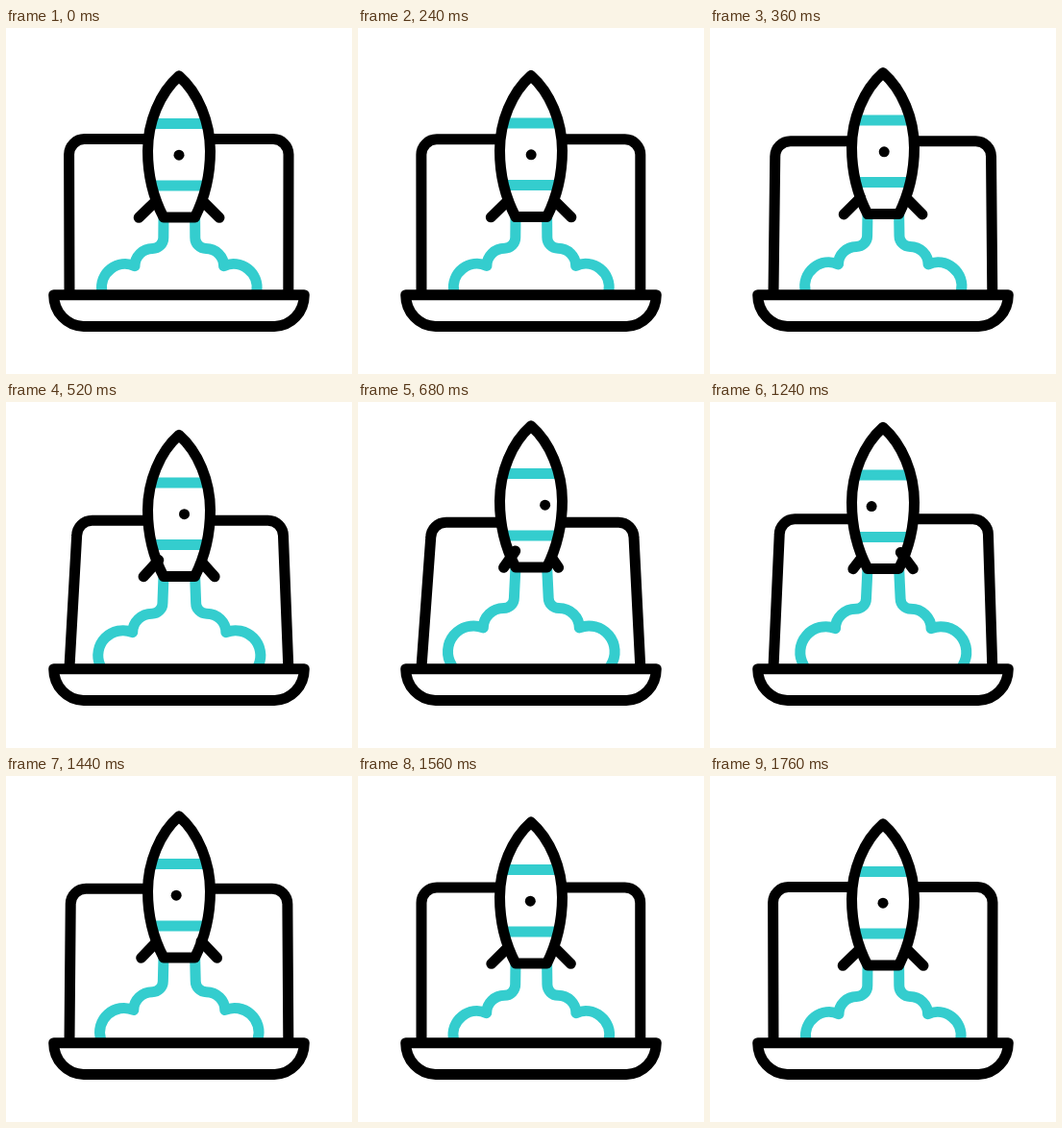
These frames come from a looping animation (360 by 360 pixels, 2000 ms). An HTML page:

```html
<!DOCTYPE html>
<html lang="en">
<head>
<meta charset="utf-8">
<title>Rocket launch</title>
<style>
  html, body { margin: 0; width: 100%; height: 100%; overflow: hidden; background: #fff; }
  svg { display: block; width: 100vw; height: 100vh; }
  .ink, .teal { fill: none; stroke: #000; stroke-width: 11; stroke-linecap: round; stroke-linejoin: round; }
  .teal { stroke: #34cdce; }
  .flat { stroke-linecap: butt; }
  .solid { fill: #fff; }
</style>
</head>
<body>
<svg viewBox="0 0 360 360">
  <defs>
    <path id="hull" d="M180 50C160 67.5 147.5 98 147.5 128C147.5 155 155 180 164 197H196.5C205 180 212.5 155 212.5 128C212.5 98 200 67.5 180 50Z"/>
  </defs>
  <path id="screen" class="ink"/>
  <path id="cloud" class="teal"/>
  <use href="#cloud" transform="translate(360.6 0) scale(-1 1)"/>
  <path class="ink solid" d="M49.7 277.7H310.3A31 32.7 0 0 1 279.3 310.4H80.7A31 32.7 0 0 1 49.7 277.7Z"/>
  <g id="rocket">
    <path id="backFin" class="ink"/>
    <use href="#hull" class="solid"/>
    <path class="teal flat" d="M152 99.5H208M153 164H207"/>
    <use href="#hull" class="ink"/>
    <circle id="porthole" cy="132.2" r="5.5"/>
    <path id="frontFin" class="ink"/>
  </g>
</svg>
<script>
const LOOP = 2000, STEP = 40;
const el = id => document.getElementById(id);
const mix = (a, b, k) => a + (b - a) * k;

// Cubic ease in and out between two times
const ease = (t, from, to) => {
  const u = Math.min(1, Math.max(0, (t - from) / (to - from)));
  return u < 0.5 ? 4 * u ** 3 : 1 - 4 * (1 - u) ** 3;
};

// Left smoke: a large puff, a small puff, then a rounded corner into the stem
function cloud(k) {
  const cx = mix(124, 120, k), cy = mix(270, 259, k), r = mix(24.5, 27, k);
  const footY = 274, footX = cx - Math.sqrt(r * r - (footY - cy) ** 2);
  const nubX = cx + 10, nubY = cy - Math.sqrt(r * r - 100);
  const topX = mix(152.5, 151.5, k), topY = mix(229.5, 213.3, k);
  const stemX = mix(163.8, 162.3, k), bend = stemX - topX;
  return `M${footX} ${footY}A${r} ${r} 0 0 1 ${nubX} ${nubY}` +
         `A${topX - nubX} ${nubY - topY} 0 0 1 ${topX} ${topY}` +
         `A${bend} ${bend} 0 0 0 ${stemX} ${topY - bend}L164 ${196 - 27 * k}`;
}

function screen(k) {
  const y = mix(115.6, 125.2, k), l = mix(65.6, 75.8, k), r = mix(294, 287, k);
  const c = 16, arc = `A${c} ${c} 0 0 1`;
  return `M66 276L${l} ${y + c}${arc} ${l + c} ${y}H${r - c}${arc} ${r} ${y + c}L293.8 276`;
}

const fin = k => `M${mix(156, 204.5, k)} 180L${mix(138.2, 222, k)} 197.3`;

function draw(t) {
  const lift = ease(t, 120, 880) - ease(t, 1000, 1760);
  const tilt = ease(t, 120, 760) - ease(t, 825, 1760);
  const spin = ease(t, 120, 1760);
  const turn = spin < 0.5 ? spin : spin - 1;

  el('rocket').setAttribute('transform', `translate(0 ${-27 * lift})`);
  el('porthole').setAttribute('cx', 180 + 30.5 * Math.sin(turn * Math.PI));
  el('frontFin').setAttribute('d', fin(spin));
  el('backFin').setAttribute('d', fin(1 - spin));
  el('screen').setAttribute('d', screen(tilt));
  el('cloud').setAttribute('d', cloud(lift));
}

const start = performance.now();
function tick() {
  const t = (performance.now() - start) % LOOP;
  draw(Math.floor(t / STEP) * STEP);
  requestAnimationFrame(tick);
}
tick();
</script>
</body>
</html>
```
